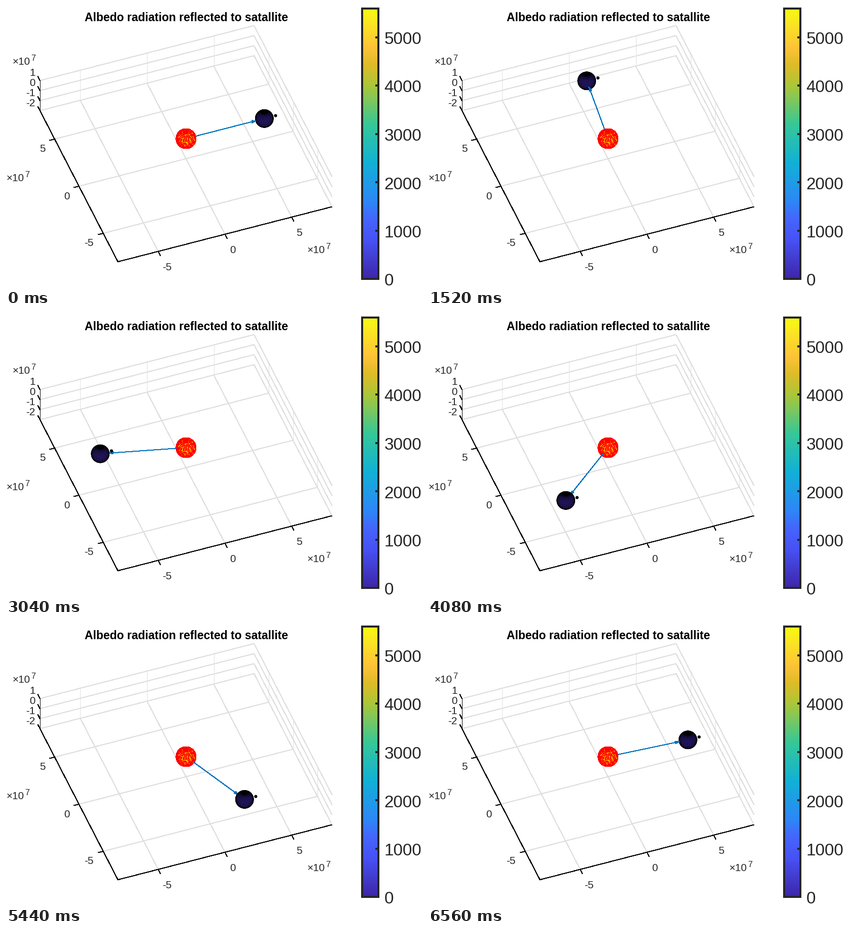
A matplotlib script that plays this animation: 820 by 555 pixels, repeating every 6640 ms.

```python
import numpy as np
import matplotlib.pyplot as plt
from matplotlib.animation import FuncAnimation
from matplotlib.colors import LinearSegmentedColormap
from matplotlib.patches import Circle, Rectangle

W, H, DPI = 820, 555, 80
FRAMES, INTERVAL = 83, 80
PX = 72 / DPI
GREY = "#262626"
GRID = "#dfdfdf"

plt.rcParams["font.family"] = "Liberation Sans"
fig = plt.figure(figsize=(W / DPI, H / DPI), dpi=DPI, facecolor="white")
ax = fig.add_axes([0, 0, 1, 1])
ax.set_xlim(-0.5, W - 0.5)
ax.set_ylim(H - 0.5, -0.5)
ax.axis("off")

# Orthographic camera: azimuth 20, elevation 45 degrees
AZ, EL = np.radians(20), np.radians(45)
SCALE = 28.0
RIGHT = np.array([np.cos(AZ), -np.sin(AZ), 0])
UP = np.array([np.sin(AZ) * np.sin(EL), np.cos(AZ) * np.sin(EL), np.cos(EL)])
TOWARD = np.cross(RIGHT, UP)
ORIGIN = np.array([354.3, 261.5])
LIM, ZLO, ZHI = 8.02, -2, 1


def offset(p):
    p = np.asarray(p, float)
    return np.stack([p @ RIGHT * SCALE, -(p @ UP) * SCALE], axis=-1)


def project(p):
    return ORIGIN + offset(p)


def line(p, q, color, width=1, z=1):
    (x0, y0), (x1, y1) = p, q
    ax.plot([x0, x1], [y0, y1], color=color, lw=width * PX, zorder=z,
            antialiased=False, solid_capstyle="butt")


def text(x, y, s, size=20.8, color=GREY, ha="center", **kw):
    ax.text(x, y, s, fontsize=size * PX, color=color, ha=ha, va="baseline", **kw)


def draw_box():
    for t in (-5, 0, 5):
        back_x, back_y = (t, LIM, ZLO), (LIM, t, ZLO)
        line(project((t, -LIM, ZLO)), project(back_x), GRID)
        line(project(back_x), project((t, LIM, ZHI)), GRID)
        line(project((-LIM, t, ZLO)), project(back_y), GRID)
        line(project(back_y), project((LIM, t, ZHI)), GRID)
    for z in range(ZLO, ZHI + 1):
        corner = project((LIM, LIM, z))
        line(project((-LIM, LIM, z)), corner, GRID)
        line(corner, project((LIM, -LIM, z)), GRID)

    front = project((-LIM, -LIM, ZLO))
    left = project((-LIM, LIM, ZLO))
    line(front, project((LIM, -LIM, ZLO)), "black", z=2)
    line(front, left, "black", z=2)
    line(left, project((-LIM, LIM, ZHI)), "black", z=2)

    along_x, along_y = offset((1, 0, 0)), offset((0, 1, 0))
    for t in (-5, 0, 5):
        p = project((t, -LIM, ZLO))
        line(p, p - 0.45 * along_y, "black", z=2)
        p = project((-LIM, t, ZLO))
        line(p, p - 0.38 * along_x, "black", z=2)
    for z in range(ZLO, ZHI + 1):
        p = project((-LIM, LIM, z))
        line(p, p + 0.45 * along_y, "black", z=2)


def draw_labels():
    text(355, 30, "Albedo radiation reflected to satallite", 22.9, "black",
         weight="bold")
    for s, x, y in (("-5", 317, 522), ("0", 446, 488), ("5", 577, 454)):
        text(x, y, s)
    for s, x, y in (("5", 71, 288), ("0", 119, 381), ("-5", 163, 474)):
        text(x, y, s)
    for s, y in (("1", 138), ("0", 158), ("-1", 178), ("-2", 197)):
        text(57, y, s, ha="right")
    for x, y in ((12, 116), (0, 346), (593, 488)):
        text(x, y, "×10", ha="left")
        text(x + 37, y - 9, "7", 16.6, ha="left")


def draw_colorbar():
    stops = [(0, (.2422, .1504, .6603)), (1 / 7, (.2810, .3228, .9579)),
             (.22, (.272, .400, .993)), (2 / 7, (.1786, .5289, .9682)),
             (3 / 7, (.0689, .6948, .8394)), (4 / 7, (.2161, .7843, .5923)),
             (5 / 7, (.6720, .7793, .2227)), (.79, (.870, .735, .158)),
             (6 / 7, (.9970, .7659, .2199)), (1, (.9769, .9839, .0805))]
    cmap = LinearSegmentedColormap.from_list("bar", stops, N=256)
    x0, x1, top, bottom = 701.5, 733.5, 4, 538.5
    ax.imshow(np.linspace(1, 0, 256)[:, None], cmap=cmap, aspect="auto",
              extent=(x0, x1, bottom, top), interpolation="nearest", zorder=1)
    ax.set_xlim(-0.5, W - 0.5)
    ax.set_ylim(H - 0.5, -0.5)
    ax.add_patch(Rectangle((x0, top), x1 - x0, bottom - top, fill=False,
                           ec=GREY, lw=4 * PX, zorder=3))
    for k in range(6):
        y = bottom - 95.5 * k
        if k:
            line((x1 - 6, y), (x1, y), GREY, 3.5, 3)
        text(745, y + 13.5, str(1000 * k), 33.3, ha="left")


def sphere_rings(radius, lats, lons):
    """Visible parts of latitude and longitude lines, as pixel offsets."""
    def visible(p):
        q = offset(p * radius / SCALE)
        q[p @ TOWARD < 0] = np.nan
        return np.vstack([q, [[np.nan, np.nan]]])

    # start each latitude at the far side so the near arc stays whole
    turn = np.linspace(0, 2 * np.pi, 73) + np.pi / 2 - AZ
    half = np.linspace(-np.pi / 2, np.pi / 2, 41)
    rows, cols = [], []
    for a in np.linspace(-np.pi / 2, np.pi / 2, lats + 1)[1:-1]:
        rows.append(visible(np.stack([np.cos(a) * np.cos(turn),
                                      np.cos(a) * np.sin(turn),
                                      np.full_like(turn, np.sin(a))], -1)))
    for b in np.arange(lons) * 2 * np.pi / lons:
        cols.append(visible(np.stack([np.cos(half) * np.cos(b),
                                      np.cos(half) * np.sin(b),
                                      np.sin(half)], -1)))
    return np.vstack(rows), np.vstack(cols)


SUN_R, PLANET_R = 19.5, 18.0


def draw_sun():
    ax.add_patch(Circle(ORIGIN, SUN_R, fc="#ffff00", ec="none", zorder=5))
    rows, cols = sphere_rings(SUN_R, 20, 20)
    a = np.linspace(0, 2 * np.pi, 121)
    rim = SUN_R * np.stack([np.cos(a), np.sin(a)], -1)
    for pts, dash in ((rows, (5, 2)), (cols, (3, 3)), (rim, (5, 2))):
        x, y = (pts + ORIGIN).T
        ax.plot(x, y, color="red", lw=PX, zorder=5.1, antialiased=False,
                dashes=dash, dash_capstyle="butt")


draw_box()
draw_labels()
draw_colorbar()
draw_sun()

mesh = np.vstack(sphere_rings(PLANET_R, 30, 40))
ball = ax.add_patch(Circle((0, 0), PLANET_R, fc="#3e26a8", ec="black",
                           lw=0.6 * PX))
wires, = ax.plot([], [], color="black", lw=0.5 * PX)
moon = ax.add_patch(Circle((0, 0), 3.1, fc="black", ec="none", zorder=9))
arrow, = ax.plot([], [], color="#0072bd", lw=PX, antialiased=False,
                 solid_capstyle="butt")

SEMI, ECC, STEP = 5.97, 0.0167, np.radians(4.35)


def orbit(i):
    mean = STEP * i
    ecc = mean
    for _ in range(6):
        ecc = mean + ECC * np.sin(ecc)
    return np.array([SEMI * (np.cos(ecc) - ECC),
                     SEMI * np.sqrt(1 - ECC ** 2) * np.sin(ecc), 0])


def update(i):
    pos = orbit(i)
    center = project(pos)
    ball.center = center
    wires.set_data(*(mesh + center).T)
    moon.center = center + offset((0.84, 0, 0))

    # the arrow shows between the two sphere surfaces only
    dist = np.linalg.norm(pos)
    start = project(pos * SUN_R / SCALE / dist)
    tip = project(pos * (1 - PLANET_R / SCALE / dist))
    way = (tip - start) / np.linalg.norm(tip - start)
    side = np.array([-way[1], way[0]])
    back = tip - 8 * way
    path = np.array([start, tip, back + 2.2 * side, tip, back - 2.2 * side])
    arrow.set_data(*path.T)

    behind = pos @ TOWARD < 0
    ball.set_zorder(3 if behind else 7)
    wires.set_zorder(3.1 if behind else 7.1)
    arrow.set_zorder(4 if behind else 6)
    return ball, wires, moon, arrow


anim = FuncAnimation(fig, update, frames=FRAMES, interval=INTERVAL,
                     repeat=True, repeat_delay=0, blit=False)
plt.show()
```
